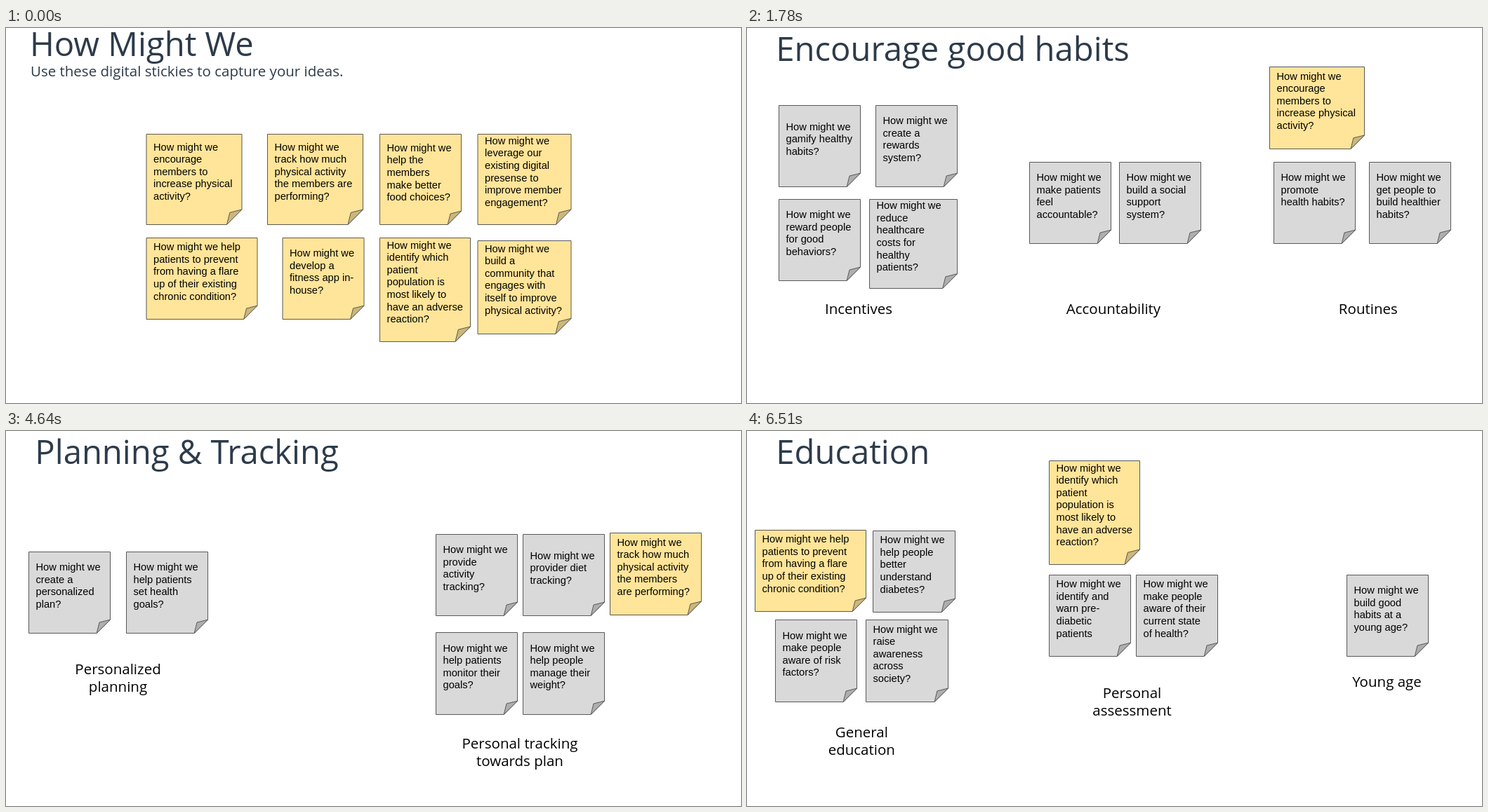
An HTML page with a canvas that plays this animation: 1047 px wide and 535 px high, repeating every 8 s.

```html
<!DOCTYPE html>
<html lang="en">
<head>
<meta charset="utf-8">
<title>How Might We</title>
<style>
  html, body { margin: 0; width: 100%; height: 100%; overflow: hidden; background: #fff; }
  canvas { display: block; }
</style>
</head>
<body>
<canvas id="stage" width="1047" height="535"></canvas>
<script>
const ctx = document.getElementById('stage').getContext('2d');
const LOOP = 8000;
const SANS = '"Liberation Sans", Arial, sans-serif';
const HUMANIST = '"Open Sans", sans-serif';
const GREY = { face: '#d9d9d9', fold: '#aeaeae' };
const YELLOW = { face: '#ffe599', fold: '#ccb77a' };

function write(text, x, y, size, family, color, align = 'left') {
  ctx.font = `${size}px ${family}`;
  ctx.fillStyle = color;
  ctx.textAlign = align;
  text.split('|').forEach((line, i) => ctx.fillText(line, x, y + i * size * 1.2));
}

function polygon(points, fill) {
  ctx.beginPath();
  points.forEach(([x, y]) => ctx.lineTo(x, y));
  ctx.closePath();
  ctx.fillStyle = fill;
  ctx.fill();
  ctx.stroke();
}

// Text is centred vertically in the area above the folded corner.
function sticky(x, y, text, w, h, paint) {
  x += 0.5;
  y += 0.5;
  const r = x + w, b = y + h, fold = Math.min(w, h) / 6;
  ctx.strokeStyle = '#595959';
  ctx.lineWidth = 1;
  ctx.lineJoin = 'round';
  polygon([[x, y], [r, y], [r, b - fold], [r - fold, b], [x, b]], paint.face);
  polygon([[r - fold, b], [r - fold * 0.8, b - fold * 0.8], [r, b - fold]], paint.fold);
  const size = 44 / 3, lines = text.split('|').length;
  const middle = y + (h - fold) / 2;
  write(text, x + 10, middle - (lines - 1) * size * 0.6 + 4.6, size, SANS, '#000');
}

const note = (x, y, text, w = 116, h = 116) => sticky(x, y, 'How ' + text, w, h, GREY);
const key = (x, y, text, w, h) => sticky(x, y, 'How ' + text, w, h, YELLOW);
const heading = (text, x = 41.3, y = 47, size = 47.2) => write(text, x, y, size, HUMANIST, '#2d3b4a');
const label = (text, x, y) => write(text, x, y, 20.5, HUMANIST, '#000', 'center');

function overview() {
  heading('How Might We', 34, 40);
  heading('Use these digital stickies to capture your ideas.', 35, 68.5, 20.5);
  key(199.5, 151, 'might we|encourage|members to|increase physical|activity?', 136, 129);
  key(372, 151, 'might we|track how much|physical activity|the members are|performing?', 136, 129);
  key(532, 151, 'might we|help the|members|make better|food choices?', 116, 129);
  key(671.5, 151, 'might we|leverage our|existing digital|presense to|improve member|engagement?', 133, 129);
  key(199.5, 299, 'might we help|patients to prevent|from having a flare|up of their existing|chronic condition?', 158, 116);
  key(393.5, 299, 'might we|develop a|fitness app in-|house?', 116, 116);
  key(532, 299, 'might we|identify which|patient|population is|most likely to|have an adverse|reaction?', 129, 148);
  key(671.5, 303, 'might we|build a|community that|engages with|itself to improve|physical activity?', 133, 133);
}

function habits() {
  heading('Encourage good habits');
  note(45, 110, 'might we|gamify healthy|habits?');
  note(183, 110, 'might we|create a|rewards|system?');
  note(45, 244, 'might we|reward people|for good|behaviors?');
  note(174, 244, 'might we|reduce|healthcare|costs for|healthy|patients?', 125, 127);
  note(402, 191, 'might we|make patients|feel|accountable?');
  note(530, 191, 'might we|build a social|support|system?');
  key(744, 55, 'might we|encourage|members to|increase physical|activity?', 135, 117);
  note(750, 191, 'might we|promote|health habits?|');
  note(886, 191, 'might we|get people to|build healthier|habits?');
  label('Incentives', 159, 407.5);
  label('Accountability', 522, 407.5);
  label('Routines', 884.8, 407.5);
}

function behaviors() {
  heading('Change specific behaviors');
  note(95, 106, 'might we|make it easier|to make|healthy|choices?', 117);
  note(26, 237, 'might we|warn users|about|unhealthy|choices?');
  note(166, 237, 'might we|prevent|patients from|making|unhealthy|choices?', 117);
  note(366, 175, 'might we|help reduce|high blood|pressure?');
  key(334, 52, 'might we|help the|members|make better|food choices?', 117, 128);
  note(467, 50, 'do we|teach patients|how to|mediate?', 117);
  note(506, 175, 'do we|reduce a|patient’s|alcohol|intake?', 117);
  note(359, 306, 'might we|help patients|stop smoking?');
  note(516, 306, 'might we|encourage|people to drink|more water?', 117);
  note(801, 58, 'do we|convince|people to|exercise|regularly?', 117);
  note(735, 191, 'might we|get people to|walk 30|minutes every|day?');
  note(866, 191, 'might we|reduce|sedentarism?|', 117);
  label('Prevent bad|choices', 154, 407.5);
  label('Change other|behavior', 490.3, 477.5);
  label('Be more active', 850, 361.5);
}

function planning() {
  heading('Planning & Tracking');
  note(32, 172, 'might we|create a|personalized|plan?');
  note(171, 172, 'might we|help patients|set health|goals?');
  note(612, 147, 'might we|provide|activity|tracking?');
  note(736, 147, 'might we|provider diet|tracking?');
  key(860, 145, 'might we|track how much|physical activity|the members|are performing?', 130, 117);
  note(612, 287, 'might we|help patients|monitor their|goals?', 116, 117);
  note(736, 287, 'might we|help people|manage their|weight?', 116, 117);
  label('Personalized|planning', 159.5, 347);
  label('Personal tracking|towards plan', 732, 453);
}

function education() {
  heading('Education');
  key(11, 141, 'might we help|patients to prevent|from having a flare|up of their existing|chronic condition?', 158, 116);
  note(179, 142, 'might we|help people|better|understand|diabetes?', 117);
  note(40, 269, 'might we|make people|aware of risk|factors?', 116, 117);
  note(169, 269, 'might we|raise|awareness|across|society?', 117, 117);
  key(430, 42, 'might we|identify which|patient|population is|most likely to|have an adverse|reaction?', 129, 148);
  note(430, 205, 'might we|identify and|warn pre-|diabetic|patients');
  note(554, 205, 'might we|make people|aware of their|current state|of health?');
  note(854, 205, 'might we|build good|habits at a|young age?');
  label('General|education', 163.3, 437);
  label('Personal|assessment', 548.5, 381);
  label('Young age', 911.5, 364.5);
}

const slides = [
  { start: 0, draw: overview },
  { start: 500, draw: habits },
  { start: 2640, draw: behaviors },
  { start: 4640, draw: planning },
  { start: 6510, draw: education },
];

const origin = performance.now();

function render() {
  const time = (performance.now() - origin) % LOOP;
  ctx.fillStyle = '#fff';
  ctx.fillRect(0, 0, 1047, 535);
  slides.findLast(slide => slide.start <= time).draw();
  requestAnimationFrame(render);
}

render();
</script>
</body>
</html>
```
